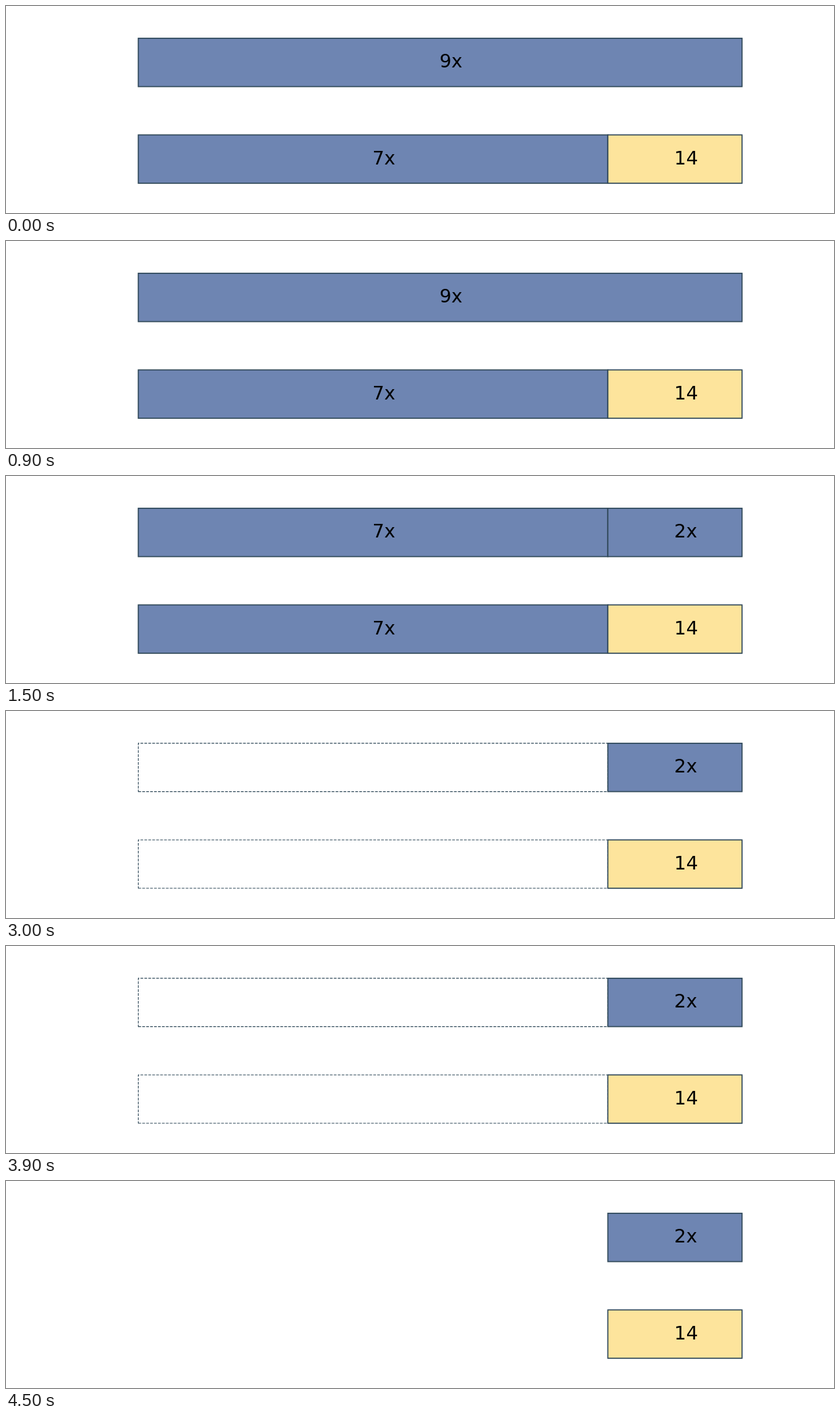
Animation of 1280x320 px, one loop 6 s. Source, as an HTML page:

```html
<!DOCTYPE html>
<html lang="en">
<head>
<meta charset="utf-8">
<title>Bar model: 9x = 7x + 14</title>
<style>
  html, body { margin: 0; width: 100%; height: 100%; overflow: hidden; background: #fff; }
  svg { display: block; width: 100vw; height: 100vh; }
  rect { stroke: #2f4858; stroke-width: 1.7; }
  .blue { fill: #6e85b2; }
  .yellow { fill: #fde49c; }
  .removed { fill: none; stroke-width: 1.1; stroke-dasharray: 4.26 1.84; }
  text { font: 28.8px "DejaVu Sans", sans-serif; fill: #000; }
</style>
</head>
<body>
<svg id="stage" viewBox="0 0 1280 320"></svg>
<script>
const STEP = 1500;
const UNIT = 103.7, LEFT = 204.5, HEIGHT = 74.7;
const TOP_ROW = 124.6, BOTTOM_ROW = 274;

// A bar spans [start, end] in units; its outline begins at the lower left corner.
function bar(row, start, end, style, label = "", labelAt = 0) {
  const x = LEFT + start * UNIT;
  const box = `<rect class="${style}" transform="translate(${x} ${row}) scale(1 -1)"
    width="${(end - start) * UNIT}" height="${HEIGHT}"/>`;
  const textX = LEFT - 1 + labelAt * UNIT;
  return box + (label && `<text x="${textX}" y="${row - 29.4}">${label}</text>`);
}

const nineX = bar(TOP_ROW, 0, 9, "blue", "9x", 4.5);
const sevenX = row => bar(row, 0, 7, "blue", "7x", 3.5);
const removed = row => bar(row, 0, 7, "removed");
const twoX = bar(TOP_ROW, 7, 9, "blue", "2x", 8);
const fourteen = bar(BOTTOM_ROW, 7, 9, "yellow", "14", 8);

const scenes = [
  nineX + sevenX(BOTTOM_ROW) + fourteen,
  sevenX(TOP_ROW) + twoX + sevenX(BOTTOM_ROW) + fourteen,
  removed(TOP_ROW) + twoX + removed(BOTTOM_ROW) + fourteen,
  twoX + fourteen
];

const stage = document.getElementById("stage");
const startTime = performance.now();
let shown = -1;

function draw() {
  const elapsed = performance.now() - startTime;
  const scene = Math.floor(elapsed / STEP) % scenes.length;
  if (scene !== shown) stage.innerHTML = scenes[shown = scene];
  requestAnimationFrame(draw);
}
draw();
</script>
</body>
</html>
```
